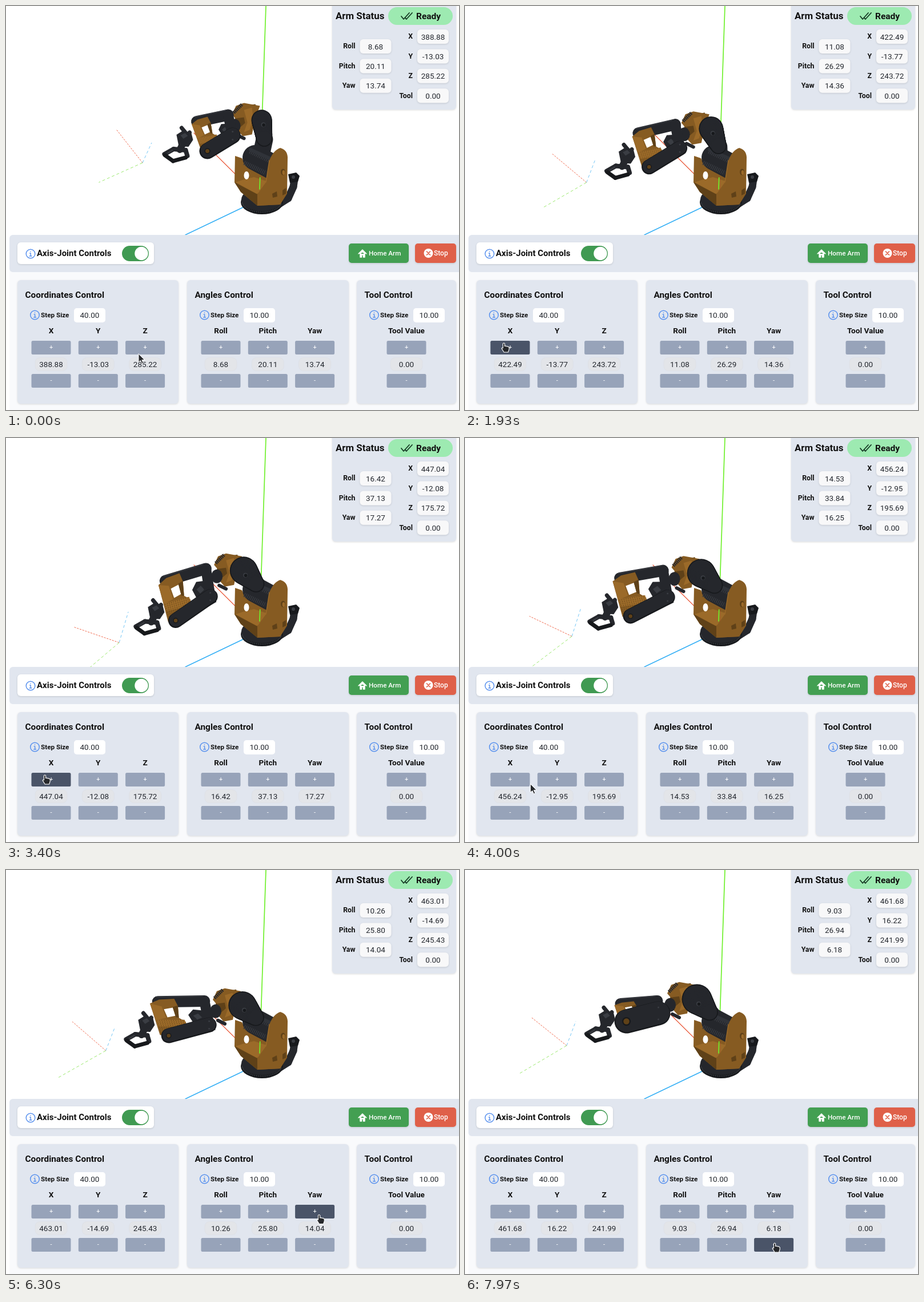
Animation, 793 px wide and 706 px high, one loop 8 s. Source, as an HTML page with a canvas:

```html
<!DOCTYPE html>
<html lang="en">
<head>
<meta charset="utf-8">
<title>Robot arm controls</title>
<style>
  html, body { margin: 0; width: 100%; height: 100%; overflow: hidden; background: #fff; }
  canvas, svg { position: absolute; left: 0; top: 0; display: block; }
  text { font-family: Roboto, "Noto Sans", sans-serif; }
  .card { filter: drop-shadow(0 1px 1.5px #0002); }
</style>
</head>
<body>
<canvas id="scene" width="793" height="400"></canvas>
<svg id="ui" width="793" height="706" viewBox="0 0 793 706"></svg>
<script>
const LOOP = 8000, TICK = 47;
const ui = document.getElementById('ui');
const ctx = document.getElementById('scene').getContext('2d');

// ---------- Interface ----------
const SLATE = '#e1e6ef', BUTTON = '#97a3b9', HOVER = '#4a5468', INK = '#23272e';
const rect = (x, y, w, h, r, fill, extra = '') =>
  `<rect x="${x}" y="${y}" width="${w}" height="${h}" rx="${r}" fill="${fill}" ${extra}/>`;
const card = (x, y, w, h, r = 6, fill = SLATE) => rect(x, y, w, h, r, fill, 'class="card"');
const circle = (x, y, r, fill, extra = '') => `<circle cx="${x}" cy="${y}" r="${r}" fill="${fill}" ${extra}/>`;
const text = (x, y, str, size, weight = 400, anchor = 'start', fill = '#111', extra = '') =>
  `<text x="${x}" y="${y + size * .36}" font-size="${size}" font-weight="${weight}" text-anchor="${anchor}" fill="${fill}" ${extra}>${str}</text>`;
const path = (d, stroke, width, fill = 'none') =>
  `<path d="${d}" stroke="${stroke}" stroke-width="${width}" fill="${fill}" stroke-linecap="round" stroke-linejoin="round"/>`;
const info = (x, y) => circle(x, y, 7.8, 'none', 'stroke="#5a92ee" stroke-width="1.5"') +
  path(`M${x - 1.3} ${y - 1}h1.5v5M${x - 1.8} ${y + 4}h3.8M${x} ${y - 4}v.2`, '#5a92ee', 1.4);
const value = (x, y, name) => text(x, y, '0.00', 13.5, 400, 'middle', INK, `data-value="${name}"`);

const statusField = (name, x, y) => text(x - 8, y, name, 12.3, 600, 'end') +
  card(x, y - 12, 55, 25, 6, '#f8f8f9') + value(x + 27.5, y + .7, name);
const statusColumn = (names, x, y) => names.map((name, i) => statusField(name, x, y + 34.4 * i)).join('');

const axisControl = (name, x) => text(x, 567, name, 13.6, 600, 'middle') +
  ['+', '-'].map((sign, i) => rect(x - 34.5, 585 + 58 * i, 69, 24, 2.5, BUTTON, 'data-button') +
    text(x, 596.5 + 58 * i, sign, 11, 400, 'middle', '#fff')).join('') +
  rect(x - 28, 614.5, 56, 23, 8, '#e3e5e9', 'stroke="#d8dbe0" stroke-width=".5"') + value(x, 626, name);
const controlCard = (x, w, title, step, names) => card(x, 479, w, 216) + text(x + 13.5, 504, title, 15.4, 600) +
  info(x + 30.5, 540) + text(x + 41, 540, 'Step Size', 11.7, 600) +
  rect(x + 99, 528, 55, 25, 5, '#fff') + text(x + 126.5, 540.5, step, 13.5, 400, 'middle', INK) +
  names.map((name, i) => axisControl(name, x + (names.length > 1 ? 59 + 82.3 * i : w / 2))).join('');

ui.innerHTML =
  rect(0, 400, 793, 306, 0, '#fff') + rect(6, 440, 800, 280, 0, '#f9fafc') + rect(6, 400, 800, 65, 6, SLATE) +
  card(571, -10, 217, 191) + text(577, 17, 'Arm Status', 16.9, 600) +
  rect(669, 2, 113, 31, 15.5, '#9deab1') + path('M692 18l4 5 10-11M699 21l2 2 10-11', '#173a25', 1.8) +
  text(718, 17, 'Ready', 15.5, 600) +
  statusColumn(['Roll', 'Pitch', 'Yaw'], 619.5, 70) + statusColumn(['X', 'Y', 'Z', 'Tool'], 720, 53) +
  card(20, 413, 239, 38, 6, '#fff') + info(43, 433) + text(54, 432, 'Axis-Joint Controls', 15, 600) +
  rect(203, 419, 47, 27, 13.5, '#409a52') + circle(237, 432.5, 11.7, '#fff') +
  card(600, 415, 105, 34, 5, '#439f52') + path('M617 433l7-7 7 7M620 433v6h2.5v-4h3v4h2.5v-6l-4-4z', '#fff', 1.5, '#fff') +
  text(635, 432, 'Home Arm', 11.7, 500, 'start', '#fff') +
  card(716, 415, 72, 34, 5, '#df6049') + circle(739.5, 432, 8, '#fff') +
  path('M736.5 429l6 6m0-6l-6 6', '#df6049', 1.7) + text(749, 432, 'Stop', 12, 500, 'start', '#fff') +
  controlCard(20, 282, 'Coordinates Control', '40.00', ['X', 'Y', 'Z']) +
  controlCard(317, 283, 'Angles Control', '10.00', ['Roll', 'Pitch', 'Yaw']) +
  controlCard(614, 174, 'Tool Control', '10.00', ['Tool Value']) +
  '<g id="arrow">' + path('M0 0V14.5L3.4 11.5 6 17 8.4 15.8 5.9 10.5H10.4Z', '#fff', 1, '#26282b') + '</g>' +
  '<g id="hand">' + path('M-1.6 1Q0-1 1.6 1V5.5L3.6 5 5.2 6 7 5.8 9.2 7.5V11L7.6 16H.2L-3.8 9.6Q-4 7.6-1.6 8.8Z', '#fff', 1.1, '#26282b') + '</g>';

const buttons = [...ui.querySelectorAll('[data-button]')];
const readouts = [...ui.querySelectorAll('[data-value]')];
const arrow = document.getElementById('arrow'), hand = document.getElementById('hand');

// ---------- Timing ----------
const clamp = v => Math.max(0, Math.min(1, v));
const mix = (a, b, k) => a.map((v, i) => v + (b[i] - v) * k);
function track(keys, t) {
  const i = keys.findIndex(key => key[0] > t);
  if (i < 0) return keys[keys.length - 1][1];
  const [t0, a] = keys[i - 1], [t1, b] = keys[i];
  return mix(a, b, (t - t0) / (t1 - t0));
}

// Each move advances the phase by one, in discrete ticks.
const moves = [[1030, 1830], [1870, 2670], [2700, 3500], [3530, 4630], [6670, 7430], [7500, 7970]];
const phaseAt = t => moves.reduce((sum, [from, to]) => t < from ? sum :
  sum + clamp((Math.floor((t - from) / TICK) + 1) / (Math.round((to - from) / TICK) + 1)), 0);

// Tool readings at a few moments; everything about the arm follows from them.
const NAMES = ['X', 'Y', 'Z', 'Roll', 'Pitch', 'Yaw'];
const rest = [388.88, -13.03, 285.22, 8.68, 20.11, 13.74];
const lowered = [422.49, -13.77, 243.72, 11.08, 26.29, 14.36];
const raised = [429.25, -15.03, 283.64, 7.99, 20, 13.14];
const deep = [447.04, -12.08, 175.72, 16.42, 37.13, 17.27];
const reach = [463.01, -14.69, 245.43, 10.26, 25.8, 14.04];
const turning = [464.18, 2.35, 266.02, 8.48, 21.82, 10.3];
const turned = [461.68, 16.22, 241.99, 9.03, 26.94, 6.18];
const lifted = mix(lowered, raised, 16 / 15);
const readings = [[0, rest], [1, mix(lowered, raised, -2 / 15)], [2, lifted], [3, mix(lifted, deep, 18 / 15)],
  [4, reach], [phaseAt(7100), turning], [6, turned]];

const plusX = [68, 589], plusYaw = [550, 587], minusYaw = [542, 652];
const pointer = [[0, [232, 608]], [270, [232, 608]], [470, plusX], [3950, plusX], [4040, [150, 617]],
  [4190, [500, 617]], [4260, plusYaw], [6270, plusYaw], [6400, minusYaw]];

// ---------- Rig ----------
const shift = ([x, y], dx, dy) => [x + dx, y + dy];
const polar = ([x, y], length, degrees) =>
  [x + length * Math.cos(degrees * Math.PI / 180), y + length * Math.sin(degrees * Math.PI / 180)];

function solveRig([X, Y, Z, , pitch], phase) {
  const dx = X - rest[0], dy = Y - rest[1], dz = Z - rest[2], dip = pitch - 20;
  const lean = clamp(phase) + clamp(phase - 2), turn = clamp((Y + 14.7) / 31);
  const shoulder = [451 - 17 * lean - 8 * turn, 208 + 11 * lean + 3.7 * lean * lean - 11 * turn];
  const tip = [239 - .93 * dx + .05 * dy - .12 * dz, 274 + .2 * dx - .35 * dy - .66 * dz];
  const gripper = polar(tip, 86, -30 - .62 * dip);
  return {
    shoulder, tip, gripper,
    wrist: polar(gripper, 30, -6 - 1.7 * dip),
    elbow: shift(shoulder, -55 - 4 * lean - 6 * turn, 1 + .7 * dip),
    span: [19 - 9 * turn, 53 + 1.1 * dip - 30 * turn],
    axes: [polar(tip, 74 + .6 * dip, 232 - 1.93 * dip), polar(tip, 84 + .18 * dx, 156 - .95 * dip),
      shift(tip, 16, -35 - 1.1 * dip)]
  };
}

// ---------- Drawing ----------
const BLACK = '#25272c', DARK = '#17191c', EDGE = '#3a3d43', GOLD = '#865b22', LIGHT = '#9b6a29', BROWN = '#5f4118';

function poly(fill, ...p) {
  ctx.beginPath();
  for (let i = 0; i < p.length; i += 2) ctx.lineTo(p[i], p[i + 1]);
  ctx.closePath();
  ctx.fillStyle = fill;
  ctx.fill();
}
function line(color, width, [x1, y1], [x2, y2], dash = []) {
  ctx.beginPath();
  ctx.moveTo(x1, y1);
  ctx.lineTo(x2, y2);
  ctx.strokeStyle = color;
  ctx.lineWidth = width;
  ctx.lineCap = dash.length ? 'butt' : 'round';
  ctx.setLineDash(dash);
  ctx.stroke();
  ctx.setLineDash([]);
}
function chain(color, width, ...points) {
  for (let i = 1; i < points.length; i++) line(color, width, points[i - 1], points[i]);
}
function oval(fill, x, y, rx, ry = rx) {
  ctx.beginPath();
  ctx.ellipse(x, y, rx, ry, 0, 0, 7);
  ctx.fillStyle = fill;
  ctx.fill();
}
function at([x, y], draw) {
  ctx.save();
  ctx.translate(x, y);
  draw();
  ctx.restore();
}

function drawAxes(tip, axes) {
  line('#ea5b3c', 1.2, [444, 336], [329, 222]);
  line('#6ff02c', 1.7, [455, 0], [444, 320]);
  line('#31aef5', 1.5, [314, 400], [444, 338]);
  ['#f0694d', '#9be86e', '#74c6f5'].forEach((color, i) => line(color, 1, tip, axes[i], i ? [5, 4] : [3, 2]));
}

function drawBase() {
  chain(BLACK, 13, [472, 350], [494, 336], [503, 316], [505, 302]);
  poly(DARK, 494, 294, 508, 291, 514, 297, 511, 307, 497, 309);
  oval(EDGE, 503, 299, 3);
  oval(DARK, 448, 343, 37, 21);
  oval(BLACK, 448, 338, 36, 20);
  for (let a = 15; a < 175; a += 6) {
    const x = Math.cos(a * Math.PI / 180), y = Math.sin(a * Math.PI / 180);
    line(EDGE, 1.2, [448 + 35 * x, 340 + 19 * y], [448 + 35 * x, 342 + 19 * y]);
  }
  poly(GOLD, 401, 262, 413, 266, 418, 276, 460, 300, 485, 320, 480, 347, 440, 349, 411, 325, 400, 308);
  poly(LIGHT, 414, 304, 434, 299, 462, 308, 458, 326, 438, 328, 402, 308);
  poly(BROWN, 400, 308, 440, 329, 440, 349, 411, 325);
  oval('#fff', 421, 296, 4.5, 7);
  line('#6ff02c', 1.7, [444.7, 300], [444, 320]);
}

function drawElbow() {
  poly(BROWN, -50, -10, -46, -30, -14, -36, -8, -10, -20, 10, -38, 14);
  poly(GOLD, -55, -18, -48, -33, -34, -38, -6, -33, -14, -11, -20, 17, -36, 20, -46, 9, -32, -3, -34, -13, -49, -11);
  poly(LIGHT, -34, -26, -20, -30, -18, -12, -24, 9, -34, 13, -28, -4);
  line(BLACK, 6, [-52, -21], [-37, -36], [2, 1]);
  oval(BLACK, -50, 2, 10, 12);
  line(BLACK, 6, [-46, 18], [-34, 24]);
}

function drawForearm({ wrist, elbow, span: [u, v] }) {
  const side = (p, k) => shift(p, u * k, v * k);
  const back = side(wrist, -.5), backEnd = side(elbow, -.35);
  const front = side(wrist, .5), frontEnd = shift(side(elbow, .35), -5, 0);
  const r = Math.max(13, 31 - .31 * Math.hypot(u, v));

  line(BLACK, 20, back, backEnd);
  line(EDGE, 1.2, shift(back, -3, -8), shift(backEnd, 0, -9));

  // Unit cell of the forearm: along the link and across its two plates, 100 each.
  ctx.save();
  ctx.transform((backEnd[0] - back[0]) / 100, (backEnd[1] - back[1]) / 100, u / 100, v / 100, ...back);
  poly(BLACK, 56, 40, 70, 24, 104, 30, 104, 85, 44, 100, 44, 72, 62, 66);
  poly(EDGE, 66, 42, 78, 36, 84, 48, 72, 54);
  poly('#fff', 88, 38, 98, 36, 98, 56, 86, 60);
  poly(GOLD, -18, 5, 4, -6, 37, -8, 40, 14, 34, 48, 46, 60, 46, 98, -18, 98);
  poly('#fff', 8, 22, 28, 18, 28, 42, 10, 46);
  poly(LIGHT, -18, 5, 5, 14, 7, 48, -17, 54);
  poly(BROWN, 28, 16, 40, 12, 34, 48, 28, 46);
  poly(LIGHT, -16, 52, 45, 54, 45, 74, -17, 72);
  for (let x = -14; x < 45; x += 5) line(BROWN, 1.3, [x, 54], [x, 92], [2, 3]);
  ctx.restore();

  line(BLACK, 18, backEnd, frontEnd);
  line(DARK, 2 * r, front, frontEnd);
  line(BLACK, 2 * r - 3, shift(front, .5, -1), shift(frontEnd, 0, -1));
  oval(DARK, ...front, r * .36);
  oval(BROWN, ...front, r * .25);
  for (const k of [-.5, .5]) oval(EDGE, ...shift(frontEnd, 0, k * r), 1.5);
}

function drawGripper() {
  chain(BLACK, 7, [-6, -18], [4, -6], [8, -10]);
  poly(BLACK, -15, -6, -4, -13, 11, -9, 14, 3, 6, 15, -11, 14);
  poly(EDGE, -8, -5, 0, -9, 5, -4, -3, 1);
  line(BLACK, 12, [-4, 10], [-9, 20]);
  chain(BLACK, 8, [4, 31], [1, 21], [-20, 19], [-36, 28]);
  chain(DARK, 7, [-35, 30], [-21, 40], [1, 34]);
  line(EDGE, 2, [-30, 26], [-22, 21]);
}

function drawShoulder([x, y]) {
  const far = Math.hypot(455 - x, 270 - y);
  const low = [x + 26 * (455 - x) / far, y + 26 * (270 - y) / far];
  const hub = [x - 3, y - 8], r = 18 + (451 - x) * .2;
  line(BLACK, 30, low, [445, 268]);
  line(BLACK, 44, [436, 265], [466, 281]);
  for (const [dx, dy] of [[-7, 14], [3, -6]])
    line(EDGE, 8, [424 + dx, 260 + dy], [462 + dx, 278 + dy], [1.2, 2]);
  line('#303339', 6, [428, 251], [470, 270]);
  // Tapered plate: overlapping discs from the hub to the pivot side.
  for (const [color, inset] of [[DARK, 0], [BLACK, 1.7]])
    for (let k = 0; k <= 1; k += .05) oval(color, ...mix(hub, low, k), r - inset - k * (r - 14));
  oval(EDGE, x, y, 4);
  oval(DARK, x + .5, y + .5, 2.8);
}

function drawFrontPlate() {
  ctx.beginPath();
  ctx.moveTo(455, 308);
  ctx.lineTo(461, 270);
  ctx.quadraticCurveTo(468, 252, 480, 248);
  ctx.quadraticCurveTo(492, 251, 493, 264);
  for (const p of [[492, 328], [480, 347], [440, 349], [440, 329]]) ctx.lineTo(...p);
  ctx.closePath();
  ctx.fillStyle = GOLD;
  ctx.fill();
  line(LIGHT, 1.5, [455, 308], [461, 270]);
  oval(BROWN, 485, 290, 4, 5.5);
  oval(LIGHT, 486, 291, 2.4, 4);
  poly(BROWN, 466, 328, 474, 324, 475, 333, 467, 335);
  poly(BROWN, 484, 322, 490, 318, 490, 328, 484, 331);
}

function drawScene(rig) {
  ctx.clearRect(0, 0, 793, 400);
  drawAxes(rig.tip, rig.axes);
  drawBase();
  at(rig.shoulder, drawElbow);
  drawForearm(rig);
  at(rig.gripper, drawGripper);
  drawShoulder(rig.shoulder);
  drawFrontPlate();
}

function drawPointer(x, y) {
  let over = false;
  for (const el of buttons) {
    const dx = x - el.x.baseVal.value, dy = y - el.y.baseVal.value;
    const hit = dx > 0 && dx < 69 && dy > 0 && dy < 22;
    el.setAttribute('fill', hit ? HOVER : BUTTON);
    over = over || hit;
  }
  for (const [el, shown] of [[arrow, !over], [hand, over]]) {
    el.setAttribute('transform', `translate(${x} ${y})`);
    el.setAttribute('visibility', shown ? 'visible' : 'hidden');
  }
}

function render(now) {
  const t = now % LOOP, phase = phaseAt(t);
  const reading = track(readings, phase);
  drawScene(solveRig(reading, phase));
  for (const el of readouts)
    el.textContent = (reading[NAMES.indexOf(el.dataset.value)] || 0).toFixed(2);
  drawPointer(...track(pointer, t));
  requestAnimationFrame(render);
}
requestAnimationFrame(render);
</script>
</body>
</html>
```
